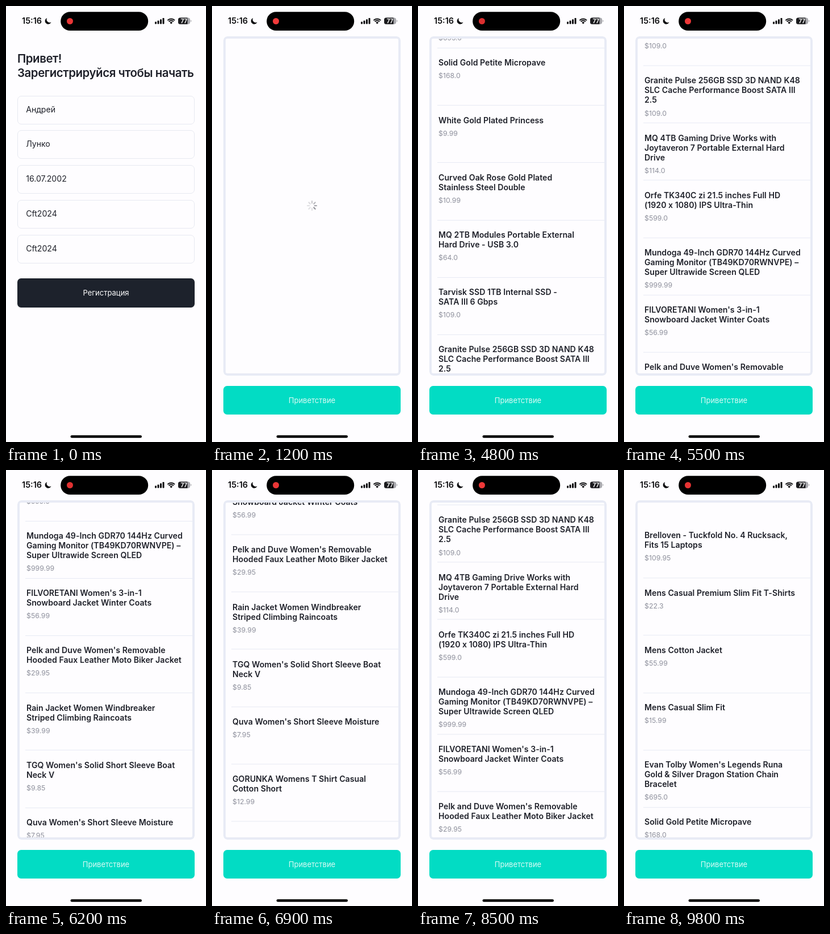
Animation, 352 px wide and 762 px high, one loop 9.9 s. Source, as an HTML page:

```html
<!DOCTYPE html>
<html lang="ru">
<head>
<meta charset="utf-8">
<title>Регистрация</title>
<style>
  html, body { margin: 0; width: 100%; height: 100%; overflow: hidden; background: #fefdff; }
  body { font-family: Inter, "Noto Sans", sans-serif; color: #1e2029; }
  div { box-sizing: border-box; }
  #stage { position: absolute; left: 0; top: 0; width: 352px; height: 762px; overflow: hidden; }
  .screen { position: absolute; inset: 0; background: #fefdff; }
  .heading {
    position: absolute; left: 20px; top: 78.5px; white-space: nowrap;
    font-size: 20.4px; font-weight: 600; line-height: 25px; letter-spacing: -.02em;
  }
  .field {
    position: absolute; left: 20px; width: 312px; height: 50px; padding-left: 14.2px;
    border: 1.8px solid #e7e9f1; border-radius: 7px;
    font-size: 14.1px; line-height: 46.6px; white-space: nowrap;
  }
  .button {
    position: absolute; left: 19.7px; width: 312.6px; height: 50.2px; border-radius: 6.5px;
    color: #fff; font-size: 13px; line-height: 50.2px; text-align: center;
  }
  #table {
    position: absolute; left: 20px; top: 53px; width: 312px; height: 593px;
    border-radius: 7px; overflow: hidden;
  }
  #table::after {
    content: ""; position: absolute; inset: 0;
    border: 4px solid #e8ebf5; border-radius: 7px;
  }
  .row { position: absolute; left: 0; width: 312px; padding: 16.4px 0 0 16px; white-space: nowrap; }
  .row::after {
    content: ""; position: absolute; left: 14.3px; right: 0; bottom: 0;
    height: 1px; background: #e7eaf4;
  }
  .name { font-size: 14.1px; font-weight: 600; line-height: 17.05px; letter-spacing: .04px; }
  .price { margin-top: 7px; font-size: 12.3px; line-height: 15px; color: #8f919d; }
  svg { position: absolute; left: 0; top: 0; }
</style>
</head>
<body>
<div id="stage">
  <div class="screen" id="form">
    <div class="heading">Привет!<br>Зарегистрируйся чтобы начать</div>
    <div class="button" style="top:476.4px;background:#1d222c">Регистрация</div>
  </div>
  <div class="screen" id="shop">
    <div id="table"><div id="list"></div></div>
    <svg width="352" height="762"><g id="spinner" transform="translate(176 349)"
      stroke="#6f7078" stroke-width="2.2" stroke-linecap="round"></g></svg>
    <div class="button" style="top:663.7px;background:#02dcc4;color:#dcfaf5">Приветствие</div>
  </div>
  <svg width="352" height="762">
    <text x="28" y="31.3" font-size="14.5" font-weight="600" fill="#0b0b0d">15:16</text>
    <path d="M72.2 20.9A5.6 5.6 0 1 0 79.4 28.3A5.4 5.4 0 0 1 72.2 20.9Z" fill="#0b0b0d"/>
    <rect x="96.2" y="10.2" width="154" height="32.8" rx="16.4"/>
    <circle id="dot" cx="112.5" cy="26.5" r="5.5"/>
    <g fill="#0b0b0d">
      <rect x="262" y="27.5" width="3" height="4" rx=".9"/>
      <rect x="266.5" y="25.6" width="3" height="5.9" rx=".9"/>
      <rect x="271" y="23.3" width="3" height="8.2" rx=".9"/>
      <rect x="275.5" y="20.9" width="3" height="10.6" rx=".9"/>
      <path d="M290.7 31.4L288.3 29A3.4 3.4 0 0 1 293.1 29Z"/>
    </g>
    <g fill="none" stroke="#0b0b0d" stroke-width="2">
      <path d="M284.4 25.1A8.9 8.9 0 0 1 297 25.1"/>
      <path d="M286.6 27.3A5.8 5.8 0 0 1 294.8 27.3"/>
    </g>
    <clipPath id="cell"><rect x="303" y="20.4" width="21" height="11.4" rx="3.6"/></clipPath>
    <g clip-path="url(#cell)">
      <rect x="303" y="20" width="21" height="12" fill="#a8a8ad"/>
      <rect x="303" y="20" width="16.4" height="12" fill="#1b1b1e"/>
    </g>
    <path d="M324.9 24.2Q326.4 24.7 326.4 26.1T324.9 28Z" fill="#a8a8ad"/>
    <text x="313.2" y="29.7" font-size="9.8" font-weight="700" fill="#fff" text-anchor="middle">77</text>
    <rect x="113.5" y="750.3" width="125.5" height="4.5" rx="2.25"/>
  </svg>
</div>
<script>
const LOOP = 9900, STEP = 100, ROW = 100.2, LOADED = 1400;
const $ = id => document.getElementById(id);

const fields = ['Андрей', 'Лунко', '16.07.2002', 'Cft2024', 'Cft2024'];

// "/" marks a line break
const goods = [
  ['Brelloven - Tuckfold No. 4 Rucksack,/Fits 15 Laptops', '109.95'],
  ['Mens Casual Premium Slim Fit T-Shirts', '22.3'],
  ['Mens Cotton Jacket', '55.99'],
  ['Mens Casual Slim Fit', '15.99'],
  ["Evan Tolby Women's Legends Runa/Gold & Silver Dragon Station Chain/Bracelet", '695.0'],
  ['Solid Gold Petite Micropave', '168.0'],
  ['White Gold Plated Princess', '9.99'],
  ['Curved Oak Rose Gold Plated/Stainless Steel Double', '10.99'],
  ['MQ 2TB Modules Portable External/Hard Drive - USB 3.0', '64.0'],
  ['Tarvisk SSD 1TB Internal SSD -/SATA III 6 Gbps', '109.0'],
  ['Granite Pulse 256GB SSD 3D NAND K48/SLC Cache Performance Boost SATA III/2.5', '109.0'],
  ['MQ 4TB Gaming Drive Works with/Joytaveron 7 Portable External Hard/Drive', '114.0'],
  ['Orfe TK340C zi 21.5 inches Full HD/(1920 x 1080) IPS Ultra-Thin', '599.0'],
  ['Mundoga 49-Inch GDR70 144Hz Curved/Gaming Monitor (TB49KD70RWNVPE) –/Super Ultrawide Screen QLED', '999.99'],
  ["FILVORETANI Women's 3-in-1/Snowboard Jacket Winter Coats", '56.99'],
  ["Pelk and Duve Women's Removable/Hooded Faux Leather Moto Biker Jacket", '29.95'],
  ['Rain Jacket Women Windbreaker/Striped Climbing Raincoats', '39.99'],
  ["TGQ Women's Solid Short Sleeve Boat/Neck V", '9.85'],
  ["Quva Women's Short Sleeve Moisture", '7.95'],
  ['GORUNKA Womens T Shirt Casual/Cotton Short', '12.99']
];

// [time, scroll offset]
const scroll = [
  [0, 0], [4000, 0], [4100, 3.7], [4300, 110], [4700, 410], [5100, 690], [5500, 950.3],
  [6000, 1190], [6500, 1380], [6900, 1442.5], [7500, 1444], [7600, 1444], [7900, 1368],
  [8500, 993.5], [9000, 530], [9400, 130], [9650, -26], [9800, -36.3], [LOOP, -36.3]
];

function add(parent, cls, html, style = '') {
  const el = document.createElement('div');
  el.className = cls;
  el.style.cssText = style;
  el.innerHTML = html;
  parent.append(el);
}

fields.forEach((text, i) => add($('form'), 'field', text, `top:${156.6 + i * 60.8}px`));

goods.forEach(([name, price], i) => {
  const title = name.replace('&', '&amp;').replaceAll('/', '<br>');
  add($('list'), 'row', `<div class="name">${title}</div><div class="price">$${price}</div>`,
    `top:${i * ROW}px;height:${ROW}px`);
});

$('spinner').innerHTML = Array.from({ length: 8 }, (_, i) =>
  `<line y1="-4.6" y2="-8" transform="rotate(${i * 45})"/>`).join('');
const spokes = [...$('spinner').children];

function offsetAt(t) {
  const i = scroll.findIndex(([end]) => end > t);
  const [t0, y0] = scroll[i - 1], [t1, y1] = scroll[i];
  return y0 + (y1 - y0) * (t - t0) / (t1 - t0);
}

// critically damped rise from 0 to 1
function rise(u) {
  if (u <= 0) return 0;
  return u >= 1.2 ? 1 : 1 - (1 + 8 * u) * Math.exp(-8 * u);
}

function draw(t) {
  $('shop').style.transform = `translateY(${762 * (1 - rise((t - 550) / 500))}px)`;
  $('list').style.visibility = t < LOADED ? 'hidden' : 'inherit';
  $('list').style.transform = `translateY(${-offsetAt(t)}px)`;

  $('spinner').style.display = t < LOADED ? '' : 'none';
  const head = 3 + Math.floor((t - 1200) / 100);
  spokes.forEach((s, i) => {
    const age = ((head - i) % 8 + 8) % 8;
    s.style.opacity = Math.max(.2, .75 - age * .13);
  });

  const glow = .5 + .5 * Math.cos((t - 1200) / 1500 * 2 * Math.PI);
  $('dot').setAttribute('fill', `rgb(${218 + 25 * glow},${46 + 12 * glow},${46 + 12 * glow})`);
}

function tick() {
  draw(Math.floor(performance.now() % LOOP / STEP) * STEP);
  requestAnimationFrame(tick);
}
tick();
</script>
</body>
</html>
```
